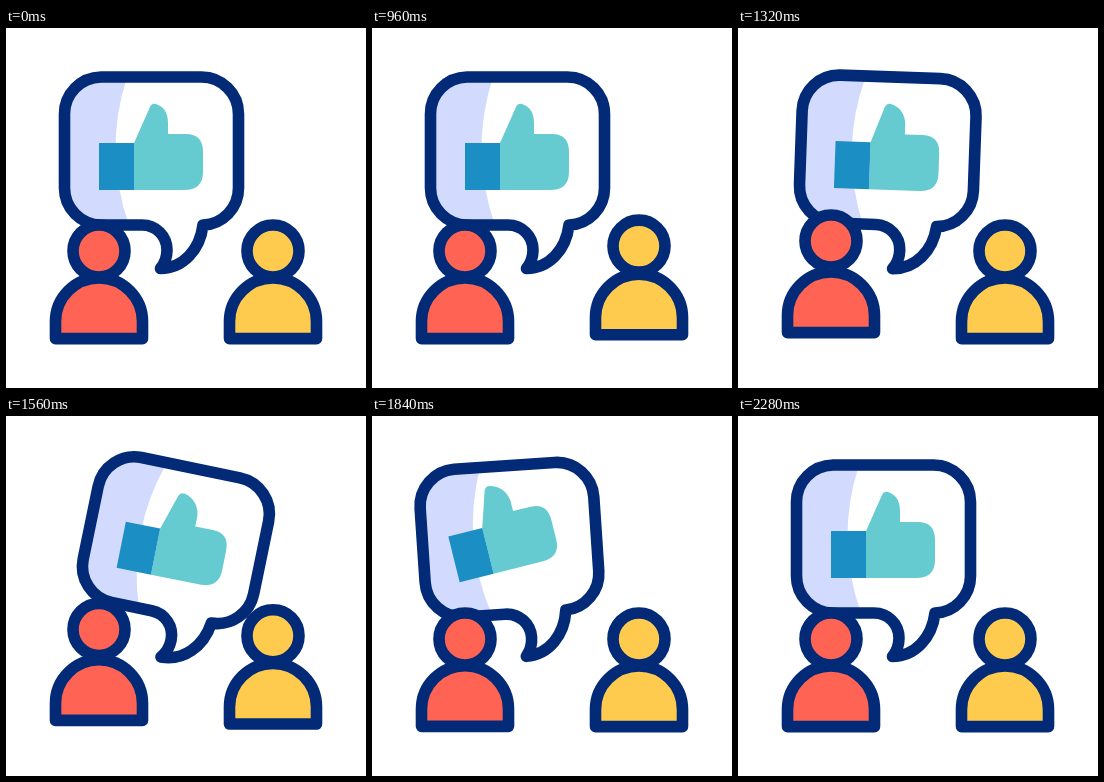
An HTML page for the animation above (3 s loop, 360 by 360 pixels).

```html
<!DOCTYPE html>
<html lang="en">
<head>
<meta charset="utf-8">
<title>Positive feedback</title>
<style>
  html, body { margin: 0; width: 100%; height: 100%; overflow: hidden; background: #fff; }
  svg { display: block; width: 100%; height: 100%; }
  .line { stroke: #022a76; stroke-width: 11.6; stroke-linejoin: round; }
</style>
</head>
<body>
<svg viewBox="0 0 360 360">
  <defs>
    <path id="body" d="M49.5 310.6V293.5a43.5 43.5 0 0 1 87 0V310.6Z"/>
    <circle id="head" cx="93" cy="223" r="26"/>
  </defs>
  <g id="bubble">
    <path fill="#d2dbfd" d="M121 49Q97 123 123 197H95A37 37 0 0 1 58.500 160V86A37 37 0 0 1 95 49Z"/>
    <path class="line" fill="none" d="M95 49H195.500A37 37 0 0 1 232.500 86V160A37 37 0 0 1 197 197C194 222 177 240 154.500 240.500C159 235 161 229 161 222C161 208 150 197 136 197H95A37 37 0 0 1 58.500 160V86A37 37 0 0 1 95 49Z"/>
    <g id="hand">
      <path id="palm" fill="#66cbd0"/>
      <path fill="#1b8fc4" d="M93 115h35v47H93Z"/>
    </g>
  </g>
  <g class="line" fill="#ff6353">
    <use id="leftBody" href="#body"/>
    <use id="leftHead" href="#head"/>
  </g>
  <g class="line" fill="#ffcb4f">
    <use id="rightBody" href="#body"/>
    <use id="rightHead" href="#head"/>
  </g>
</svg>
<script>
const LOOP = 3000, STEP = 40;
const el = id => document.getElementById(id);

// Share of the way from time a to time b, clamped to 0..1
const part = (t, a, b) => Math.min(1, Math.max(0, (t - a) / (b - a)));

function ease(t, a, b) {
  const u = part(t, a, b);
  return u * u * (3 - 2 * u);
}

// Eases up from a to b, holds, and eases back from c to d
const pulse = (t, a, b, c, d) => ease(t, a, b) - ease(t, c, d);

const hop = (t, a, b) => Math.sin(Math.PI * part(t, a, b));

const set = (id, transform) => el(id).setAttribute('transform', transform);

function draw(now) {
  const t = Math.floor(now % LOOP / STEP) * STEP;

  const tilt = 12.2 * pulse(t, 1250, 1520, 1520, 1900) - 5 * pulse(t, 1520, 1900, 1900, 2140);
  const wave = -11 * pulse(t, 1540, 1740, 1800, 2040);
  set('bubble', `rotate(${tilt} 152 243)`);
  set('hand', `rotate(${wave} 93 162)`);

  // The thumb tip leans back while the bubble swings
  const k = -4.5 * pulse(t, 1200, 1400, 2040, 2260);
  el('palm').setAttribute('d', `M128 115L${144 + k} 79Q${146 + k} 75 ${150 + k} 76Q${162 + k / 2} 80 162 95V106H180Q197 106 197 124V144Q197 162 178 162H128Z`);

  // The left body follows its head a step later
  const rise = time => pulse(time, 1120, 1300, 1520, 1840);
  set('leftHead', `translate(0 ${-10 * rise(t)})`);
  set('leftBody', `translate(0 ${-6.2 * rise(t - STEP)})`);

  const bounce = 12 * hop(t, 920, 1220) + 3.3 * hop(t, 1440, 1720);
  set('rightHead', `translate(174 ${-bounce})`);
  set('rightBody', `translate(174 ${-0.8 * bounce})`);
}

const start = performance.now();
function tick() {
  draw(performance.now() - start);
  requestAnimationFrame(tick);
}
tick();
</script>
</body>
</html>
```
